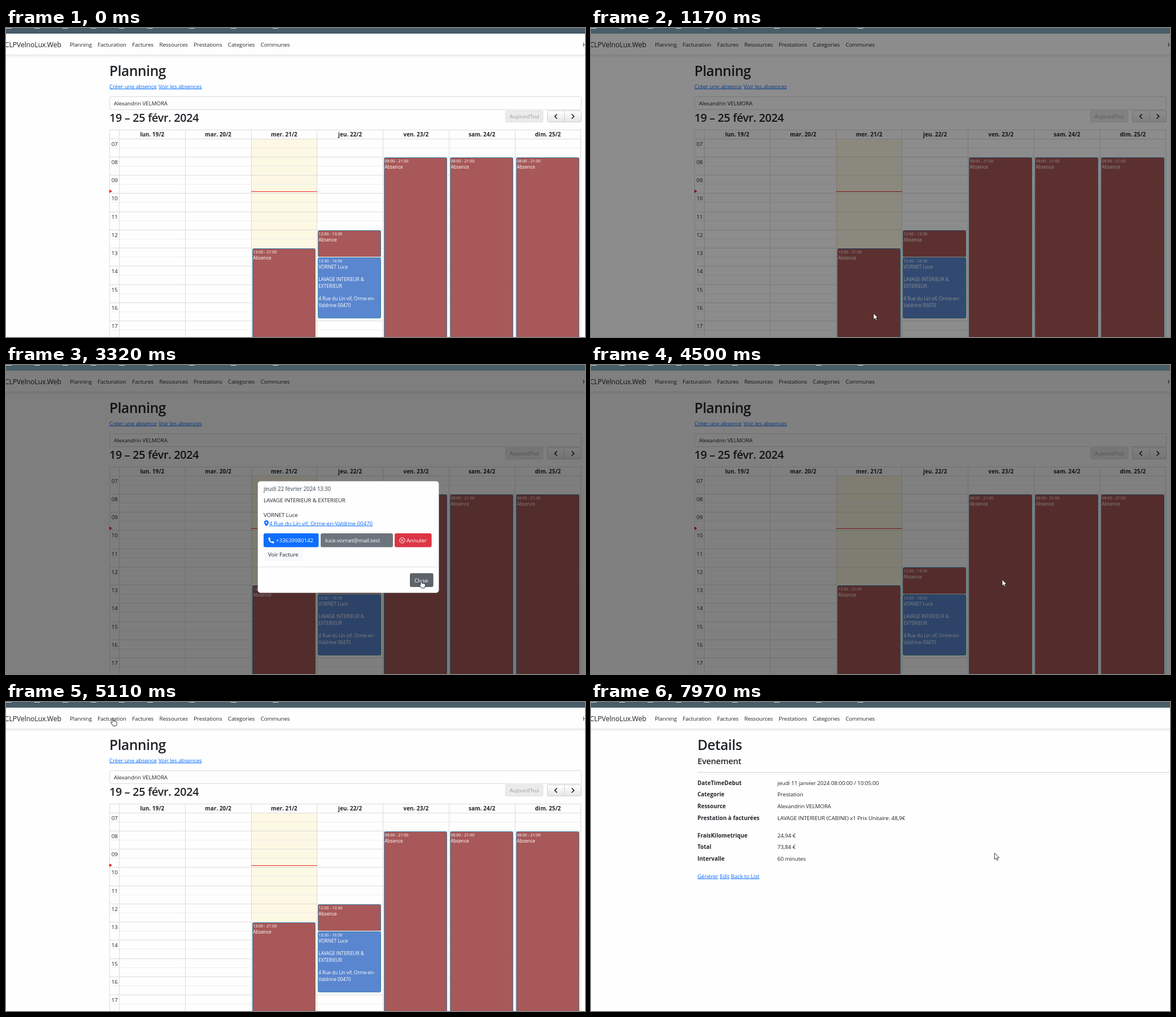
Recreate the animation shown at these times as an HTML page. Size 1025 by 547 pixels, loop 8000 ms.

```html
<!DOCTYPE html>
<html lang="fr">
<head>
<meta charset="utf-8">
<title>Planning</title>
<style>
html, body { margin: 0; width: 100%; height: 100%; overflow: hidden; background: #fefefe; }
svg { display: block; width: 100%; height: 100%; font: 9.8px "Open Sans", "Noto Sans", sans-serif; fill: #212529; }
text { letter-spacing: -.009em; white-space: pre; }
.b { font-weight: 700; letter-spacing: .008em; }
.h { font-weight: 600; letter-spacing: -.016em; }
.m { font-weight: 500; }
.a { fill: #0d6efd; text-decoration: underline; }
.c { text-anchor: middle; }
.e { text-anchor: end; }
.w { fill: #fff; }
.muted { fill: #6c757d; }
.off { fill: #9d9d9d; }
</style>
</head>
<body>
<svg id="stage" viewBox="0 0 1025 547" preserveAspectRatio="none"></svg>
<script>
const LOOP = 8000;
const BODY = 10.3, ROW = 42, HOUR = 32.25, DAY = 116.75;
const WHITE = '#fefefe', RULE = '#dcdcdc';
const AGENT = 'Alexandrin VELMORA';
const $ = id => document.getElementById(id);

// Drawing helpers
const text = (x, y, s, cls = '', size = BODY) =>
  `<text x="${x}" y="${y}" class="${cls}" font-size="${(size * .95).toFixed(2)}">${s}</text>`;
const box = (x, y, w, h, fill, more = '') =>
  `<rect x="${x}" y="${y}" width="${w}" height="${h}" fill="${fill}" ${more}/>`;
const frame = (x, y, w, h, fill, stroke, r = 2) =>
  box(x + .5, y + .5, w - 1, h - 1, fill, `stroke="${stroke}" rx="${r}"`);
const hline = (x1, x2, y, color = RULE) => box(x1, y, x2 - x1, 1, color);
const vline = (x, y1, y2, color = RULE) => box(x, y1, 1, y2 - y1, color);
const group = (id, body) => `<g id="${id}">${body}</g>`;
const repeat = (n, draw) => [...Array(n).keys()].map(draw).join('');
const title = (x, s) => text(x, 84.5, s, 'h', 25.8);

function browserBar() {
  return box(0, 0, 1025, 10, '#485d68') +
    repeat(9, i => box(50 * i + 24 * Math.max(0, i - 5), 0, 10, 1, '#d5dce0'));
}

function navBar() {
  const links = ['Planning', 'Facturation', 'Factures', 'Ressources', 'Prestations', 'Categories', 'Communes'];
  const items = links.map((s, i) => `<tspan dx="${i ? BODY : 0}">${s}</tspan>`).join('');
  return box(0, 10, 1025, 38, WHITE) + hline(0, 1025, 47, '#e3e5e8') + box(0, 48, 1025, 5, 'url(#shade)') +
    text(98, 34, 'CLPVelnoLux.Web', 'e', 12.9) + text(113, 33, items);
}

// Week view
const colX = day => 200.5 + day * DAY;
const hourY = h => 196.5 + (h - 7) * HOUR;

function event(day, from, to, fill, hours, lines) {
  const x = Math.round(colX(day) + 1.6), y = Math.round(hourY(from));
  const h = Math.round(hourY(to)) - y;
  return box(x - 1, y - 1, 114, h + 2, '#fff', 'rx="3"') + frame(x, y, 112, h, fill, '#3a87ad') +
    text(x + 1.2, y + 8.5, hours, 'w', 7.6) +
    lines.map((s, i) => text(x + 1.2, y + 19.5 + i * 11.35, s, 'w', 8.85)).join('');
}

function planning() {
  const days = ['lun.', 'mar.', 'mer.', 'jeu.', 'ven.', 'sam.', 'dim.'];
  const red = '#a85858';
  const absence = (day, from, to, hours) => event(day, from, to, red, hours, ['Absence']);
  const heading = text(1021, 33, 'H') + title(183, 'Planning') +
    text(183, 106.5, 'Créer une absence', 'a') + text(270, 106.5, 'Voir les absences', 'a') +
    frame(183, 121, 836, 24, WHITE, '#d6dade', 3) + text(191, 136.5, AGENT) +
    text(183, 165.5, '19 – 25 févr. 2024', 'h', 20.9) +
    frame(884, 146, 67, 21, '#ebebeb', '#dedede') + text(917.5, 160, 'Aujourd\'hui', 'c off') +
    frame(958, 146, 61, 21, 'url(#button)', '#cfcfcf') + vline(988, 147, 167, '#cfcfcf') +
    '<path d="M975.5 152.5l-4 4 4 4M1001.5 152.5l4 4-4 4" fill="none" stroke="#222" stroke-width="1.7"/>';
  const hours = repeat(11, i => {
    const y = Math.round(hourY(i + 7)) - 1;
    return hline(183, 1018, y) + hline(183, 1018, y + 16, '#eee') +
      text(192.2, y + 12.6, String(i + 7).padStart(2, '0'), 'c');
  });
  const columns = hline(183, 1019, 180) + vline(183, 180, 547) +
    repeat(8, i => vline(Math.round(colX(i) - .3), 180, 547)) +
    days.map((d, i) => text(colX(i) + DAY / 2, 192, `${d} ${19 + i}/2`, 'b c')).join('');
  const nowMark = hline(434, 550.7, 289, '#e8262c') + '<path d="M183 286l5 3-5 3z" fill="#e8101c"/>';
  const events = absence(2, 13, 21, '13:00 - 21:00') + absence(3, 12, 13.5, '12:00 - 13:30') +
    event(3, 13.5, 16.84, '#5a86cf', '13:30 - 16:50', ['VORNET Luce', '', 'LAVAGE INTERIEUR &amp;',
      'EXTERIEUR', '', '4 Rue du Lin vif, Orme-en-', 'Valdrine 00470']) +
    repeat(3, i => absence(4 + i, 8, 21, '08:00 - 21:00'));
  return heading + box(434, 196, DAY, 351, '#fcf8e3') + hours + columns + nowMark + events;
}

// Billing table
function billing() {
  const cols = [193.5, 283.5, 454.5, 549.5, 767.5, 925.5, 969];
  const heads = ['Nom', 'Adresse', 'Date', 'Nom Ressource', 'Prestations', 'Total'];
  const full = 'LAVAGE INTERIEUR &amp;|EXTERIEUR';
  const max = (date, wash = full, price = '73,90', road = '418 Rue du pre dorval') =>
    ['TARVELIN|Quorin', road, date + '|08:00:00', AGENT, wash, price];
  const luce = date => ['Luce Vornet', '3 Rue du Lin vif', date + '|09:00:00',
    'MONSIEUR FLORIVAL TARDOM (VELNOLUX|ORMAIS)', full, '73,90'];
  const rows = [
    max('11/01/2024', 'LAVAGE INTERIEUR (CABINE)', '73,84'),
    luce('12/01/2024'),
    max('15/01/2024', 'LAVAGE/LUSTRAGE|EXTERIEUR', '60,20', '418 Rue du Pre Dorval,|Appartement 207'),
    luce('08/02/2024'),
    luce('08/02/2024'),
    max('13/02/2024'),
    ['A A', '40 rue du Lin vif', '14/02/2024|08:00:00', AGENT, full, '96,57']
  ];
  const cell = (s, c, y) => s.split('|').map((part, i) =>
    text(cols[c], y + i * 15.5, part, c > 5 ? 'a' : c > 3 ? 'b' : '')).join('');
  return title(188.5, 'Prestations à facturer') + text(188.5, 106.5, 'Create New', 'a') +
    heads.map((s, c) => text(cols[c], 137.5, s, 'b')).join('') + hline(188, 1024, 146, '#54585c') +
    rows.map((row, i) => {
      const y = 164 + i * ROW;
      const cells = [...row.slice(0, 5), row[5] + '|€', 'Voir|Facture'];
      return cells.map((s, c) => cell(s, c, y)).join('') + hline(188, 1024, y + 24, '#dee2e6');
    }).join('');
}

function details() {
  const rows = [
    ['DateTimeDebut', 'jeudi 11 janvier 2024 08:00:00 / 10:05:00'],
    ['Categorie', 'Prestation'],
    ['Ressource', AGENT],
    ['Prestation à facturées', 'LAVAGE INTERIEUR (CABINE) x1 Prix Unitaire: 48,9€'],
    ['FraisKilometrique', '24,94 €'],
    ['Total', '73,84 €'],
    ['Intervalle', '60 minutes']
  ];
  return title(188.5, 'Details') + text(188.5, 110, 'Evenement', 'h', 15.4) + hline(188, 1024, 124, '#d2d3d4') +
    rows.map(([name, value], i) => {
      const y = 146.5 + i * 20.7 + (i > 3 ? 10.3 : 0);
      return text(188.5, y, name, 'b') + text(330, y, value);
    }).join('') +
    text(188.5, 311.5, 'Générer', 'a') + text(228, 311.5, 'Edit', 'a') + text(247.5, 311.5, 'Back to List', 'a');
}

// Dialog
const button = (label, x, y, w, fill, over, cls = 'w m', pad = 8) => ({ label, x, y, w, h: 24.5, fill, over, cls, pad });
const buttons = [
  button('+33639980142', 456, 298, 97.5, '#0d6efd', '#0b5ed7', 'w m', 22),
  button('luce.vornet@mail.test', 557, 298, 128, '#6c757d', '#5c636a'),
  button('Annuler', 688, 298, 65.5, '#dc3545', '#bb2d3b', 'w m', 21),
  button('Voir Facture', 456, 323, 70, '#f8f9fa', '#d3d4d5', ''),
  button('Close', 715, 368.5, 41.5, '#6c757d', '#5c636a')
];

function dialog() {
  const pin = '<path d="M461 285.500c-2.500-3-4-4.700-4-6.500a4 4 0 0 1 8 0c0 1.800-1.500 3.500-4 6.500z" fill="#0d6efd"/>' +
    '<circle cx="461" cy="279" r="1.600" fill="#fff"/>';
  const phone = '<path d="M465.500 307c.3 4.500 3 7 7.500 7.500" fill="none" stroke="#fff" stroke-width="1.900"/>' +
    '<path d="M464.300 307l2-1.700 2 3-1.700 1.700zM470.500 313.500l1.500-1.500 2.800 1.700-1.500 2z" fill="#fff" stroke="#fff" stroke-width=".6"/>';
  const cross = '<path d="M699.4 308.4l4.2 4.2m0-4.2l-4.2 4.2" stroke="#fff"/>' +
    '<circle cx="701.5" cy="310.5" r="4.7" fill="none" stroke="#fff"/>';
  return box(445.5, 205.5, 321, 198, WHITE, 'stroke="#000" stroke-opacity=".2" rx="5"') +
    text(456, 223, 'jeudi 22 février 2024 13:30', 'h muted') +
    text(456, 243, 'LAVAGE INTERIEUR &amp; EXTERIEUR') + text(456, 268.5, 'VORNET Luce') +
    pin + text(466, 283.5, '4 Rue du Lin vif, Orme-en-Valdrine 00470', 'a') +
    buttons.map((b, i) => box(b.x, b.y, b.w, b.h, b.fill, `rx="3" id="btn${i}"`) +
      text(b.x + b.pad, b.y + 16, b.label, b.cls)).join('') +
    phone + cross + hline(446, 766, 357, '#dee2e6');
}

const arrow = '<path id="arrow" d="M0 0V11.2L2.6 8.8 4.4 12.6 6.2 11.8 4.5 8.1H8z" fill="#fff" stroke="#111" stroke-width=".8"/>';
const hand = '<path id="hand" d="M-1.2 1c0-1.4 2.2-1.4 2.2 0v4l5 1c1 .3 1.3 1 1.3 2 0 2.6-.6 3.8-1.3 5.8h-5.5c-1-2-2.7-3.5-3.7-5.300-.5-1 .8-1.700 2-.2z" fill="#fff" stroke="#111" stroke-width=".9"/>';
const fade = (id, from, to) => `<linearGradient id="${id}" x2="0" y2="1">
  <stop stop-color="${from}"/><stop offset="1" stop-color="${to}"/></linearGradient>`;

$('stage').innerHTML = `<defs>${fade('shade', '#0001', '#0000')}${fade('button', '#fff', '#e6e6e6')}</defs>` +
  box(0, 0, 1025, 547, WHITE) + navBar() +
  group('planning', planning()) + group('billing', billing()) + group('details', details()) +
  box(0, 10, 1025, 537, '#000', 'id="veil"') + group('dialog', dialog()) +
  browserBar() + group('cursor', arrow + hand);

// Where the pointer is at key moments: time, x, y
const path = [
  [0, 640, 590], [900, 598, 472], [1170, 500, 505],
  [1900, 482, 311], [2330, 616, 313.5], [2600, 758, 318], [2760, 497, 341], [3320, 735, 381],
  [4500, 728, 380], [4620, 246, 116], [4850, 190, 29], [5360, 188, 28],
  [5850, 129.5, 225], [6200, 149, 228], [6970, 918, 251],
  [7400, 979, 160], [7800, 979, 160], [7970, 714.5, 267.5]
];

const ramp = (t, a, b) => Math.max(0, Math.min(1, (t - a) / (b - a)));
const smooth = p => p * p * (3 - 2 * p);
const mix = (a, b, p) => a + (b - a) * p;

function pointer(t) {
  const next = path.findIndex(key => key[0] > t);
  if (next < 0) return path[path.length - 1].slice(1);
  const [t0, x0, y0] = path[next - 1], [t1, x1, y1] = path[next];
  const p = smooth(ramp(t, t0, t1));
  return [mix(x0, x1, p), mix(y0, y1, p)];
}

const inside = (x, y, r) => x >= r.x && x <= r.x + r.w && y >= r.y && y <= r.y + r.h;
const show = (id, on) => $(id).setAttribute('display', on ? 'inline' : 'none');
const targets = {
  planning: [{ x: 553, y: 406, w: 111, h: 108 }, { x: 163, y: 20, w: 51, h: 20 }],
  billing: [{ x: 969, y: 156, w: 18, h: 11 }],
  details: []
};

function draw(t) {
  const [x, y] = pointer(t);
  const page = t < 5360 ? 'planning' : t < 7910 ? 'billing' : 'details';
  Object.keys(targets).forEach(id => show(id, id === page));

  const veil = .5 * (ramp(t, 1000, 1190) - ramp(t, 4500, 4682));
  $('veil').setAttribute('opacity', veil);
  const open = smooth(ramp(t, 1190, 1490)) - smooth(ramp(t, 4180, 4480));
  show('dialog', open > 0);
  $('dialog').setAttribute('opacity', open);
  $('dialog').setAttribute('transform', `translate(0 ${-32 * (1 - open)})`);

  buttons.forEach((b, i) => $('btn' + i).setAttribute('fill', open && inside(x, y, b) ? b.over : b.fill));
  const active = open ? buttons : veil ? [] : targets[page];
  const hot = active.some(r => inside(x, y, r));
  show('arrow', !hot);
  show('hand', hot);
  $('cursor').setAttribute('transform', `translate(${x} ${y})`);
}

const start = performance.now();
function tick() {
  draw((performance.now() - start) % LOOP);
  requestAnimationFrame(tick);
}
tick();
</script>
</body>
</html>
```
